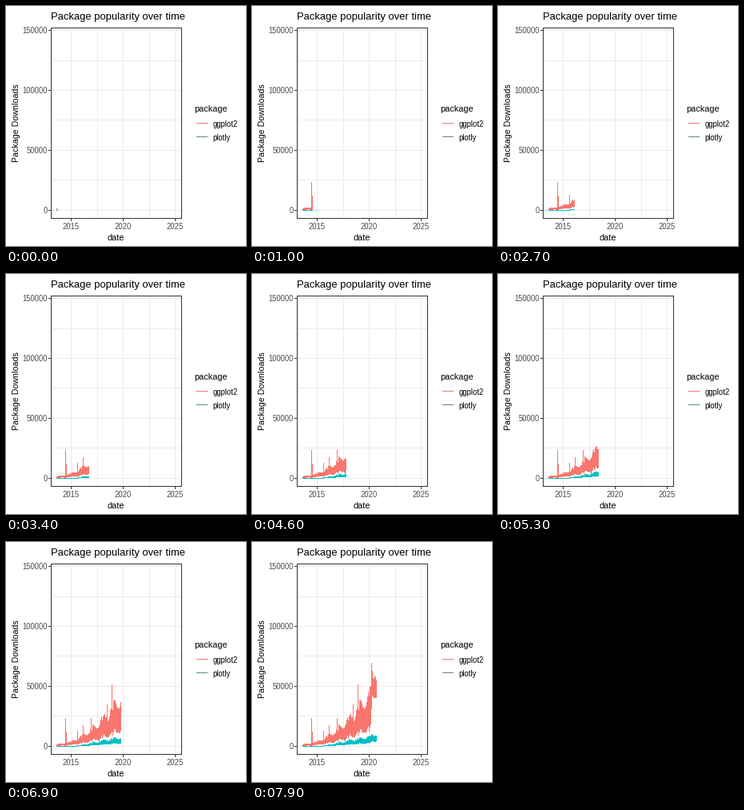
A matplotlib script for the animation above (8000 ms loop, 300 by 300 pixels).

```python
import numpy as np
import matplotlib.pyplot as plt
from matplotlib.animation import FuncAnimation
from matplotlib.patches import Rectangle

FRAMES, STEP = 80, 100
RED, TEAL, MUTED = "#F8766D", "#00BFC4", "#5C8587"
GRID, DARK, LABEL = "#EBEBEB", "#333333", "#4D4D4D"
LEFT, RIGHT, TOP, BOTTOM = 56, 219, 27, 265
FIRST_DAY = 2013.6

plt.rcParams.update({"font.family": "Liberation Sans", "toolbar": "None"})


def px(year):
    return 81.5 + 13.04 * (year - 2015)


def py(thousands):
    return 255.03 - 1.494 * thousands


def series(launch, scale, power, start, surge, peaks, seed):
    """Daily downloads: power growth, yearly season, weekly rhythm, 2020 surge."""
    rng = np.random.default_rng(seed)
    days = np.arange(2590)
    t = FIRST_DAY + days / 365.25
    growth = start + scale * np.maximum(t - launch, 0) ** power
    season = 1 + 0.2 * np.cos(2 * np.pi * (t - 0.05))
    new_year = (t + 0.5) % 1 - 0.5
    season *= 1 - 0.35 * np.exp(-(new_year / 0.04) ** 2)
    jump = np.clip((t - 2020.14) / 0.1, 0, 1)
    high = growth * season + surge[1] * jump
    low = 0.36 * growth * season + surge[0] * jump

    week = rng.uniform(0.78, 1.06, days.size // 7 + 1)[days // 7]
    busy = high * week * rng.uniform(0.92, 1, days.size)
    quiet = low * rng.uniform(1, 1.3, days.size)
    value = np.where(days % 7 < 5, np.maximum(busy, quiet), quiet)
    for year, peak in peaks:
        value[np.argmin(abs(t - year))] = peak
    return px(t), py(value)


def columns(curve, head):
    """Vertical extent of the revealed days in each pixel column."""
    x, y = (v[curve[0] <= head] for v in curve)
    col, first = np.unique(np.floor(x), return_index=True)
    return dict(values=np.floor(np.minimum.reduceat(y, first)),
                edges=np.append(col, col[-1] + 1),
                baseline=np.floor(np.maximum.reduceat(y, first)) + 1)


GGPLOT = series(FIRST_DAY, 1.2, 1.9, 1.3, (25, 16),
                [(2014.46, 19.4), (2014.475, 23.4), (2014.54, 12),
                 (2015.58, 12.6), (2016.12, 16.8), (2016.93, 23.3),
                 (2018.07, 24.5), (2018.42, 34.3), (2018.88, 51),
                 (2020.23, 69.6)], 4)
PLOTLY = series(2015.6, 1.5, 1.1, 0, (1.3, 1), [(2017.7, 6.3)], 9)

fig = plt.figure(figsize=(300 / 72, 300 / 72), dpi=72, facecolor="white")
ax = fig.add_axes([0, 0, 1, 1])
ax.set(xlim=(0, 300), ylim=(300, 0))
ax.axis("off")


def line(x, y, color):
    ax.plot(x, y, color=color, lw=1, aa=False, zorder=1,
            solid_capstyle="butt")


def text(x, y, s, size, color="black", ha="left", **kw):
    ax.text(x, y, s, size=size, color=color, ha=ha, **kw)


for year in np.arange(2015, 2026, 2.5):
    x = np.floor(px(year))
    line([x, x], [TOP, BOTTOM], GRID)
    if year % 5 == 0:
        line([x, x], [BOTTOM, BOTTOM + 3], DARK)
        text(x + 0.5, 279, f"{year:.0f}", 9.5, LABEL, "center")

for k in range(0, 151, 25):
    y = np.floor(py(k))
    line([LEFT, RIGHT], [y, y], GRID)
    if k % 50 == 0:
        line([LEFT - 3, LEFT], [y, y], DARK)
        text(51.5, y + 4, str(k * 1000), 9.5, LABEL, "right")

ax.add_patch(Rectangle((LEFT, TOP), RIGHT - LEFT, BOTTOM - TOP, fill=False,
                       ec=DARK, lw=1, aa=False, zorder=5))

text(56, 17, "Package popularity over time", 13)
text(137.5, 293, "date", 11, ha="center")
text(13, 146.5, "Package Downloads", 10.6, ha="center", va="center",
     rotation=90)
text(235.4, 132, "package", 11)
for y, name, color in ((146, "ggplot2", RED), (163, "plotly", MUTED)):
    line([238, 251], [y, y], color)
    text(258.5, y + 5, name, 9.5)


def head(i):
    return 64.15 + 1.156 * i


bands = [(ax.stairs(**columns(curve, head(0)), fill=True, color=color, lw=0,
                    antialiased=False, zorder=z), curve)
         for z, (color, curve) in enumerate([(RED, GGPLOT), (TEAL, PLOTLY)], 3)]


def draw(i):
    for band, curve in bands:
        band.set_data(**columns(curve, head(i)))
    return [band for band, _ in bands]


anim = FuncAnimation(fig, draw, frames=FRAMES, interval=STEP,
                     repeat=True, repeat_delay=0)
plt.show()
```
